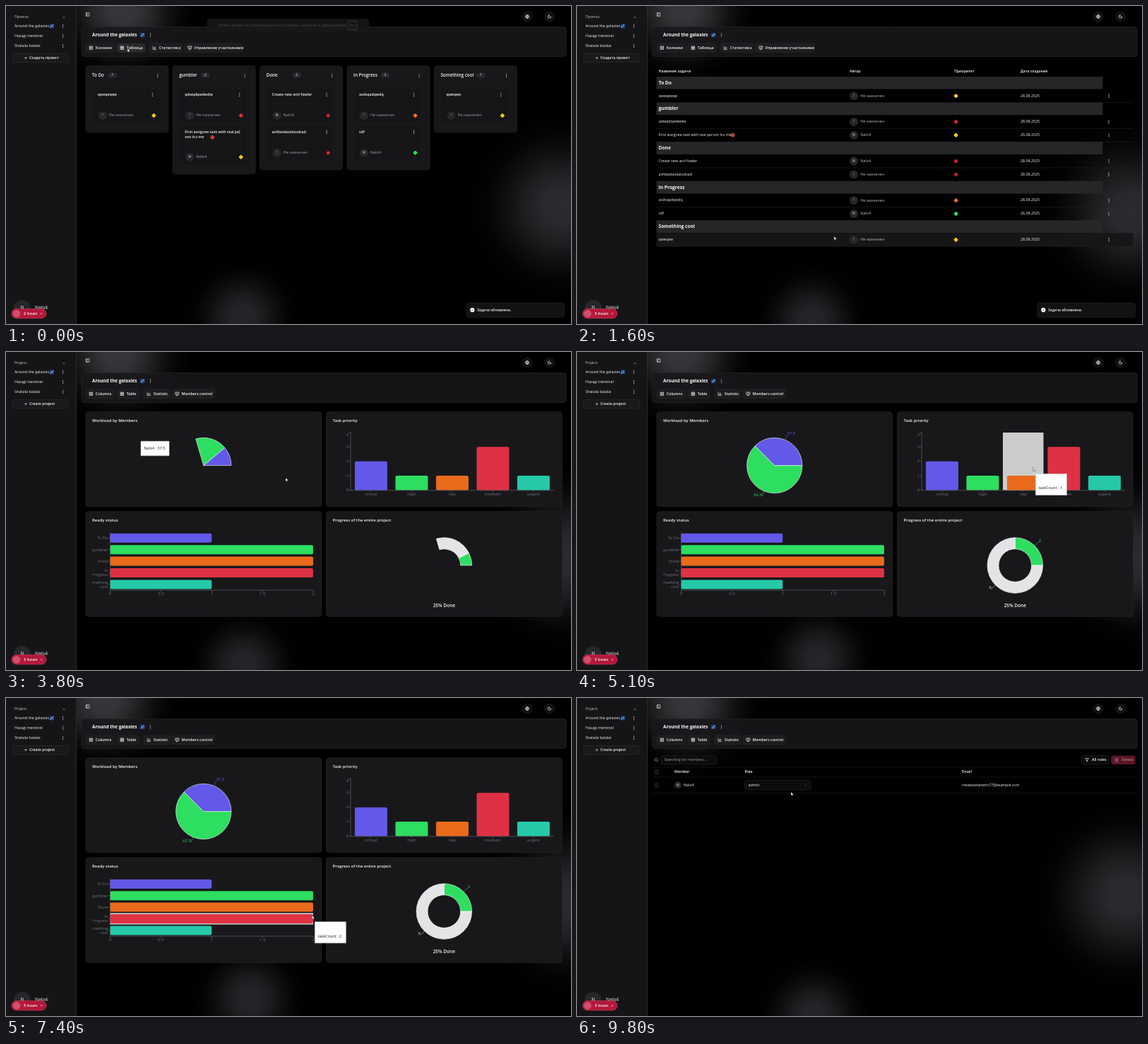
An HTML page with a canvas that plays this animation: 800 px wide and 450 px high, repeating every 9900 ms.

```html
<!DOCTYPE html>
<html lang="en">
<head>
<meta charset="utf-8">
<style>
html, body { margin: 0; width: 100%; height: 100%; overflow: hidden; background: #000; }
canvas { display: block; width: 800px; height: 450px; }
</style>
</head>
<body>
<canvas width="800" height="450"></canvas>
<script>
const ctx = document.querySelector('canvas').getContext('2d');
const LOOP = 9900, STEP = 100;
const ENGLISH = 3000, TABLE = 300, STATS = 3100, MEMBERS = 9400;
const USER = 'Nalo4', PROJECT = 'Around the galaxies';
const WHITE = '#f4f4f5', GRAY = '#a1a1aa', DIM = '#71717a', PANEL = '#18181b', LINE = '#27272a';
const YELLOW = '#eec814', RED = '#dc2636', CRIMSON = '#bd1222', ORANGE = '#f0701a', GREEN = '#2cdc5c';
const SERIES = ['#6259e8', '#2ede60', '#ea6a1c', '#de3244', '#25c9a8'];

const ICONS = {
  columns: 'M3 3h7v7H3zM14 3h7v7h-7zM3 14h7v7H3zM14 14h7v7h-7z',
  table: 'M3 3h18v18H3zM3 9h18M3 15h18M12 3v18',
  chart: 'M3 2v19h19M8 17v-5M13 17V6M18 17v-8',
  monitor: 'M2 3h20v13H2zM7 21h10M12 16v5M7 8h10',
  sidebar: 'M3 3h18v18H3zM9 3v18',
  globe: 'M2 12a10 10 0 1 0 20 0a10 10 0 1 0-20 0M2 12h20M12 2q-9 10 0 20q9-10 0-20',
  moon: 'M12 3a6 6 0 0 0 9 9a9 9 0 1 1-9-9z',
  up: 'M5 16l7-7l7 7',
  down: 'M6 9l6 6l6-6',
  plus: 'M12 3v18M3 12h18',
  close: 'M5 5l14 14M19 5L5 19',
  search: 'M3 11a8 8 0 1 0 16 0a8 8 0 1 0-16 0M17 17l5 5',
  funnel: 'M2 3h20l-8 10v8l-4-2v-6z',
  trash: 'M3 6h18M8 6V2h8v4M5 6v16h14V6M10 11v6M14 11v6',
  check: 'M6 12l4 4l8-8',
};

const RU = {
  projects: 'Проекты', create: 'Создать проект', nobody: 'Не назначен',
  tabs: [['Колонки', 113, 41], ['Таблица', 157, 40], ['Статистика', 203, 47], ['Управление участниками', 253, 83]],
  heads: ['Название задачи', 'Автор', 'Приоритет', 'Дата создания'],
};
const EN = {
  projects: 'Projects', create: 'Create project', nobody: 'Not assigned',
  tabs: [['Columns', 113, 40], ['Table', 157, 31], ['Statistic', 195, 37], ['Members control', 235, 60]],
  heads: ['Task name', 'Author', 'Priority', 'Created at'],
};

// Each task: title, assigned?, priority colour, day of the month
const GROUPS = [
  ['To Do', 94, 38, [['qweqewqe', 0, YELLOW, 28]]],
  ['gumbler', 153, 46, [['qdwqdqwdwdw', 0, RED, 28], ['First assignee task with real person it;s me', 1, YELLOW, 26]]],
  ['Done', 147, 52, [['Create new anti fowler', 1, CRIMSON, 28], ['asfdasdasdassdsad', 0, CRIMSON, 28]]],
  ['In Progress', 147, 54, [['asdsqadqwdq', 0, ORANGE, 28], ['sdf', 1, GREEN, 26]]],
  ['Something cool', 94, 66, [['qweqwe', 0, YELLOW, 28]]],
];
const PRIORITY = [['critical', 2], ['high', 1], ['low', 1], ['medium', 3], ['urgent', 1]];
const STATUS = [[['To Do'], 1], [['gumbler'], 2], [['Done'], 2], [['In', 'Progress'], 2], [['Something', 'cool'], 1]];

const CURSOR = [
  [0, 172, 60], [300, 174, 60], [1000, 300, 200], [1600, 364, 326], [2200, 500, 325], [2900, 753, 125],
  [3000, 738, 16], [3100, 214, 58], [3500, 302, 128], [3800, 396, 178], [4400, 500, 170], [5000, 640, 165],
  [5500, 692, 150], [6000, 262, 252], [6300, 266, 257], [7000, 300, 330], [7600, 480, 300], [8100, 400, 240],
  [8500, 286, 138], [9000, 284, 136], [9300, 266, 58], [9400, 267, 58], [9800, 303, 133],
];
const GLOW_BOTTOM = [[0, 335, 440], [1600, 332, 446], [2900, 347, 426], [3800, 337, 444], [6300, 345, 426], [8500, 345, 425], [9800, 335, 450]];
const GLOW_RIGHT = [[0, 786, 284], [1600, 783, 292], [2900, 802, 290], [3800, 790, 290], [6300, 806, 290], [8500, 795, 285], [9800, 776, 280]];
const GLOW_TOP = [[0, 165, 4], [1600, 150, 2], [2900, 138, 0], [3800, 158, 2], [6300, 138, 0], [8500, 140, 0], [9800, 158, 4]];

function along(keys, t) {
  const next = keys.findIndex(k => k[0] > t);
  if (next < 0) return keys.at(-1).slice(1);
  const [a, b] = [keys[next - 1], keys[next]];
  const p = (t - a[0]) / (b[0] - a[0]);
  const s = p * p * (3 - 2 * p);
  return [a[1] + (b[1] - a[1]) * s, a[2] + (b[2] - a[2]) * s];
}

// cubic-bezier(.25, .1, .25, 1)
function ease(x) {
  if (x <= 0) return 0;
  if (x >= 1) return 1;
  const curve = (u, a, b) => 3 * u * (1 - u) ** 2 * a + 3 * u * u * (1 - u) * b + u ** 3;
  let lo = 0, hi = 1;
  for (let i = 0; i < 20; i++) {
    const mid = (lo + hi) / 2;
    if (curve(mid, .25, .25) < x) lo = mid; else hi = mid;
  }
  return curve(lo, .1, 1);
}

function text(s, x, y, size = 5.4, color = WHITE, weight = 400, align = 'left') {
  ctx.font = `${weight} ${size}px "Open Sans", "Noto Sans", sans-serif`;
  ctx.textAlign = align;
  ctx.textBaseline = 'middle';
  ctx.fillStyle = color;
  ctx.fillText(s, x, y);
}

function box(x, y, w, h, r, fill, stroke) {
  ctx.beginPath();
  ctx.roundRect(x, y, w, h, r);
  paint(fill, stroke);
}

function circle(x, y, r, fill, stroke) {
  ctx.beginPath();
  ctx.arc(x, y, r, 0, 7);
  paint(fill, stroke);
}

function paint(fill, stroke, width = .6) {
  ctx.lineWidth = width;
  if (fill) { ctx.fillStyle = fill; ctx.fill(); }
  if (stroke) { ctx.strokeStyle = stroke; ctx.stroke(); }
}

function line(x1, y1, x2, y2, color, width = .6) {
  ctx.beginPath();
  ctx.moveTo(x1, y1);
  ctx.lineTo(x2, y2);
  paint(null, color, width);
}

function icon(name, x, y, size = 6, color = WHITE) {
  ctx.save();
  ctx.translate(x - size / 2, y - size / 2);
  ctx.scale(size / 24, size / 24);
  ctx.strokeStyle = color;
  ctx.lineWidth = 2.6;
  ctx.stroke(new Path2D(ICONS[name]));
  ctx.restore();
}

function dots(x, y) {
  for (const d of [-2, 0, 2]) circle(x, y + d, .6, WHITE);
}

function avatar(x, y, assigned, r = 6) {
  circle(x, y, r, LINE);
  text(assigned ? 'N' : '?', x, y, 5, assigned ? WHITE : GRAY, 400, 'center');
}

function diamond(x, y, color) {
  ctx.save();
  ctx.translate(x, y);
  ctx.rotate(Math.PI / 4);
  box(-2.4, -2.4, 4.8, 4.8, 1, color);
  ctx.restore();
  if (color === CRIMSON) line(x - 1, y + 1.2, x + 1, y - 1.2, '#f0b0b0');
}

function galaxy(x, y) {
  box(x - 3, y - 3, 6.5, 6, 1.5, '#24457c');
  line(x - 2, y + 2, x + 2.5, y - 2, '#7ba0dc', 1.2);
}

function hotFace(x, y) {
  circle(x, y, 2.7, '#d8433c');
  line(x - 1.4, y - .6, x + 1.4, y - .6, '#6b1717', .8);
}

function glow([x, y], r, level) {
  const g = ctx.createRadialGradient(x, y, 0, x, y, r);
  [1, .93, .68, .35, .1, 0].forEach((k, i) => g.addColorStop(i / 5, `rgba(${level},${level},${level + 4},${k})`));
  ctx.fillStyle = g;
  ctx.fillRect(x - r, y - r, 2 * r, 2 * r);
}

function sidebar(t, lang) {
  box(0, 0, 99, 450, 0, '#151517');
  line(99.5, 0, 99.5, 450, '#2b2b2e', 1);
  text(lang.projects, 12, 16, 4.7, '#c8c8cc');
  icon('up', 82, 16, 5);
  [PROJECT, 'Hasagi mentinel', 'Shalalai balalai'].forEach((name, i) => {
    text(name, 12, 28.5 + i * 14, 5.3);
    dots(80.5, 28.5 + i * 14);
  });
  galaxy(64.5, 28.5);
  box(9.5, 67.5, 78.5, 12, 2.5, '#19191c', '#303034');
  icon('plus', 28, 73.5, 5);
  text(lang.create, 33, 73.7, 5.3, WHITE, 600);
  circle(23, 428, 12, LINE);
  text('N', 23, 427, 6.5, WHITE, 400, 'center');
  text(USER, 41, 427, 6.6);
  box(8, 428.5, 49, 13.5, 6.8, '#b3183a', '#d23a5b');
  circle(15, 435.3, 5.4, '#d0506c');
  text(t < 500 ? '2' : '3', 25, 435.3, 5, WHITE, 700);
  text('Issues', 29.5, 435.3, 5, WHITE, 600);
  icon('close', 50, 435.3, 5, '#f4c0cc');
}

function header(lang, mouse) {
  icon('sidebar', 115.5, 12, 6);
  for (const [name, x] of [['globe', 738], ['moon', 769.5]]) {
    circle(x, 15, 6.8, '#111113', LINE);
    icon(name, x, 15, 6);
  }
  box(107, 29.5, 686.5, 42, 4, 'rgba(24,24,27,.9)', LINE);
  text(PROJECT, 122, 41.3, 6.4, WHITE, 700);
  galaxy(193, 41);
  dots(204.5, 41);
  lang.tabs.forEach(([label, x, w], i) => {
    const hover = mouse[0] > x && mouse[0] < x + w && mouse[1] > 52 && mouse[1] < 66;
    box(x, 53, w, 12.5, 2.5, hover ? '#2a2a2d' : '#1d1d20', '#2a2a2d');
    icon(['columns', 'table', 'chart', 'monitor'][i], x + 7.3, 59.2, 6);
    text(label, x + (i < 3 ? 13.8 : 13.5), 59.3, 5.3, WHITE, 600);
  });
}

function board(lang) {
  GROUPS.forEach(([name, height, pill, tasks], i) => {
    const x = 112.8 + i * 123.4;
    box(x, 84.8, 117, height, 4, PANEL, LINE);
    text(name, x + 9, 98, 6.3, WHITE, 600);
    box(x + pill - 6, 94.5, 12, 6.8, 3.4, '#2b2b2f');
    text(tasks.length, x + pill, 98, 4.6, WHITE, 400, 'center');
    dots(x + 102, 98.5);
    tasks.forEach(([title, assigned, color], j) => {
      const y = 125.5 + j * 52.8, long = title.length > 30;
      const foot = y + (long ? 35.5 : 29.5);
      box(x + 9, y - 9.5, 96, foot - y + 22, 3, '#161618', '#202023');
      if (long) {
        text(title.slice(0, 32), x + 17, y, 5.2, WHITE, 600);
        text(title.slice(33), x + 17, y + 7.5, 5.2, WHITE, 600);
        hotFace(x + 56, y + 7.5);
      } else text(title, x + 17, y, 5.2, WHITE, 600);
      dots(x + 94.5, y);
      avatar(x + 24, foot, assigned);
      text(assigned ? USER : lang.nobody, x + 33, foot, 5.5, GRAY);
      diamond(x + 96.5, foot, color);
    });
  });
}

function table(lang, mouse) {
  const columns = [115.5, 386, 534, 628];
  lang.heads.forEach((s, i) => text(s, columns[i], 92.5, 5.2, WHITE, 600));
  let y = 100;
  for (const [name, , , tasks] of GROUPS) {
    box(112.5, y, 632, 17.6, 0, '#262628');
    text(name, 115.5, y + 9, 6.7, WHITE, 700);
    y += 17.8;
    for (const [title, assigned, color, day] of tasks) {
      const mid = y + 9.4;
      if (mouse[1] > y && mouse[1] < y + 18.9) box(112.5, y, 675, 18.9, 0, '#161618');
      text(title, 115.5, mid, 5.25);
      if (title.length > 30) hotFace(220.5, mid);
      avatar(392, mid, assigned);
      text(assigned ? USER : lang.nobody, 401.3, mid, 5.4, '#c4c4c8');
      diamond(536.5, mid, color);
      text(`${day}.08.2025`, 628, mid, 5.3);
      dots(753, mid);
      y += 18.9;
      line(112.5, y, 787.5, y, '#222225');
    }
  }
}

function sector(cx, cy, inner, outer, from, to, fill, stroke) {
  ctx.beginPath();
  ctx.arc(cx, cy, outer, -from, -to, true);
  if (inner) ctx.arc(cx, cy, inner, -to, -from);
  else ctx.lineTo(cx, cy);
  ctx.closePath();
  paint(fill, stroke);
}

function pie(cx, cy, inner, outer, parts, progress, done) {
  const total = parts[0][0] + parts[1][0];
  let from = 0;
  for (const [value, color] of parts) {
    const size = value / total * 2 * Math.PI, to = from + size * progress;
    sector(cx, cy, inner, outer, from, to, color, '#fff');
    if (done) {
      const a = from + size / 2, c = Math.cos(a), s = Math.sin(a);
      line(cx + outer * c, cy - outer * s, cx + (outer + 8) * c, cy - (outer + 8) * s, color);
      text(value, cx + (outer + 8) * c, cy - (outer + 8) * s - 1.5, 5.8, color, 400, c > 0 ? 'left' : 'right');
    }
    from = to;
  }
}

function tooltip(x, y, label, tall) {
  const w = tall ? 44 : 40, h = tall ? 30 : 20.5;
  box(x, y, w, h, 0, '#fff', '#ccc');
  text(label, x + 4.2, y + (tall ? 20.5 : 10.7), 5.5, '#18181b');
}

function stats(t, [mx, my]) {
  const age = t - STATS, grow = ease(age / 400), sweep = ease((age - 400) / 1500), done = age >= 1900;
  const cards = [['Workload by Members', 112.8, 84.8, 134], ['Task priority', 453.3, 84.8, 134],
    ['Ready status', 112.8, 225.8, 148.5], ['Progress of the entire project', 453.3, 225.8, 148.5]];
  for (const [title, x, y, h] of cards) {
    box(x, y, 334, h, 4, PANEL, LINE);
    text(title, x + 9.3, y + 13, 5.9, WHITE, 600);
  }
  pie(279.7, 160.6, 0, 39.2, [[37.5, SERIES[0]], [62.5, SERIES[1]]], sweep, done);
  pie(620.3, 302, 23.3, 39.3, [[2, SERIES[1]], [6, '#e4e4e7']], sweep, done);
  text('25% Done', 620.3, 359.7, 6.5, WHITE, 600, 'center');

  const overBars = mx > 488 && mx < 775 && my > 114 && my < 196;
  const overRows = mx > 147.5 && mx < 435 && my > 255 && my < 337;
  const bar = overBars ? Math.floor((mx - 488) / 57.5) : -1;
  const row = overRows ? Math.floor((my - 255) / 16.4) : -1;

  for (let i = 0; i < 5; i++) {
    const y = 195.5 - i * 20.4;
    line(485.5, y, 488, y, DIM);
    text(i, 485, i < 4 ? y : 117, 5.8, DIM, 400, 'right');
  }
  PRIORITY.forEach(([name, n], i) => {
    const x = 488 + i * 57.5, h = n * 20.4 * grow;
    if (i === bar) box(x, 114, 57.5, 81.5, 0, '#ccc');
    box(x + 5.9, 195.5 - h, 46, h, 2, SERIES[i]);
    line(x + 28.8, 195.5, x + 28.8, 198, DIM);
    text(name, x + 28.8, 201.5, 5.9, DIM, 400, 'center');
  });
  line(488, 113.5, 488, 195.8, DIM);
  line(488, 195.8, 775.5, 195.8, DIM);

  ctx.save();
  ctx.beginPath();
  ctx.rect(122.3, 230, 324, 140);
  ctx.clip();
  STATUS.forEach(([words, n], i) => {
    const y = 255 + i * 16.4, mid = y + 8.2;
    if (i === row) box(147.5, y, 287.5, 16.4, 0, '#ccc');
    box(147.5, y + 1.8, n * 143.7 * grow, 13, 2, SERIES[i]);
    line(145, mid, 147.5, mid, DIM);
    words.forEach((s, j) => text(s, 144.5, mid + .5 + (j - (words.length - 1) / 2) * 6, 5.8, DIM, 400, 'right'));
  });
  ctx.restore();
  line(147.5, 255, 147.5, 337, DIM);
  line(147.5, 337, 435, 337, DIM);
  for (let i = 0; i < 5; i++) {
    const x = 147.5 + i * 71.9;
    line(x, 337, x, 339.5, DIM);
    text(i / 2, x, 342.5, 5.8, DIM, 400, 'center');
  }

  const angle = Math.atan2(160.6 - my, mx - 279.7);
  const overPie = done && Math.hypot(mx - 279.7, my - 160.6) < 39 && angle > 0 && angle < Math.PI * .75;
  const tx = mx + 4, ty = my + 9;
  const share = `${USER} : 37.5`;
  if (bar >= 0) tooltip(tx, ty, `taskCount : ${PRIORITY[bar][1]}`, true);
  if (row >= 0) tooltip(tx, ty, `taskCount : ${STATUS[row][1]}`, true);
  if (overPie) tooltip(tx, ty, share);
  if (t >= 3600 && t < 4000) tooltip(191 + (t - 3800) * .2, 126.3 + (t - 3800) * .04, share);
}

function members() {
  icon('search', 112.5, 87.7, 6, GRAY);
  box(119, 81.8, 78, 12, 2.5, '#0c0c0d', LINE);
  text('Searching for members...', 123.5, 87.8, 5.1, GRAY);
  box(714.5, 81.5, 38.5, 12.5, 2.5, '#0b0b0c', LINE);
  icon('funnel', 722, 87.7, 6);
  text('All roles', 729, 87.8, 5.4, WHITE, 600);
  box(756.5, 81.5, 34, 12.5, 2.5, '#5c1526');
  icon('trash', 764, 87.7, 6, '#a8828a');
  text('Delete', 771, 87.8, 5.4, '#a8828a', 600);
  for (const y of [98, 112, 134.5]) line(107, y, 793, y, '#1d1d20');
  for (const y of [105, 123.5]) box(109.8, y - 2.9, 5.8, 5.8, 1, '#111113', '#303034');
  [['Member', 138], ['Role', 237.5], ['Email', 545]].forEach(([s, x]) => text(s, x, 105, 5.3, WHITE, 600));
  avatar(143, 123.3, true, 5);
  text(USER, 150.8, 123.4, 5.4);
  box(237.5, 116.3, 93.5, 13.8, 2.5, '#0c0c0d', LINE);
  text('admin', 242.5, 123.4, 5.4);
  icon('down', 323.5, 123.3, 5, DIM);
  text('meadowlantern77@example.com', 545, 123.4, 5.2);
}

function fullscreenHint(t) {
  ctx.globalAlpha = Math.max(0, 1 - t / 400);
  box(285, 18, 229, 19, 2, 'rgba(24,24,26,.85)');
  text('Чтобы выйти из полноэкранного режима, нажмите и удерживайте', 300, 27.7, 5.6, '#4c4c50');
  box(484, 21.5, 12.5, 12, 1, null, '#4c4c50');
  text('Esc', 490.3, 27.7, 4.8, '#4c4c50', 400, 'center');
  ctx.globalAlpha = 1;
}

function toast() {
  box(652, 420, 138.5, 20.5, 3, '#121214', '#232326');
  circle(660.3, 430.2, 3.1, WHITE);
  icon('check', 660.3, 430.2, 5, '#121214');
  text('Задача обновлена.', 667, 430.5, 5, WHITE, 600);
}

function pointer([x, y]) {
  ctx.save();
  ctx.translate(x, y);
  ctx.beginPath();
  for (const p of [[0, 0], [0, 5], [1.2, 4], [2, 5.6], [2.8, 5.2], [2.1, 3.6], [3.6, 3.5]]) ctx.lineTo(...p);
  ctx.closePath();
  paint('#fff', '#222', .4);
  ctx.restore();
}

function draw(t) {
  const lang = t < ENGLISH ? RU : EN, mouse = along(CURSOR, t);
  box(0, 0, 800, 450, 0, '#000');
  glow(along(GLOW_TOP, t), 105, 56);
  glow(along(GLOW_RIGHT, t), 130, 44);
  glow(along(GLOW_BOTTOM, t), 82, 38);
  sidebar(t, lang);
  header(lang, mouse);
  if (t < TABLE) board(lang);
  else if (t < STATS) table(lang, mouse);
  else if (t < MEMBERS) stats(t, mouse);
  else members();
  if (t < 400) fullscreenHint(t);
  if (t < STATS) toast();
  pointer(mouse);
}

function tick() {
  draw(Math.floor(performance.now() % LOOP / STEP) * STEP);
  requestAnimationFrame(tick);
}
tick();
</script>
</body>
</html>
```
